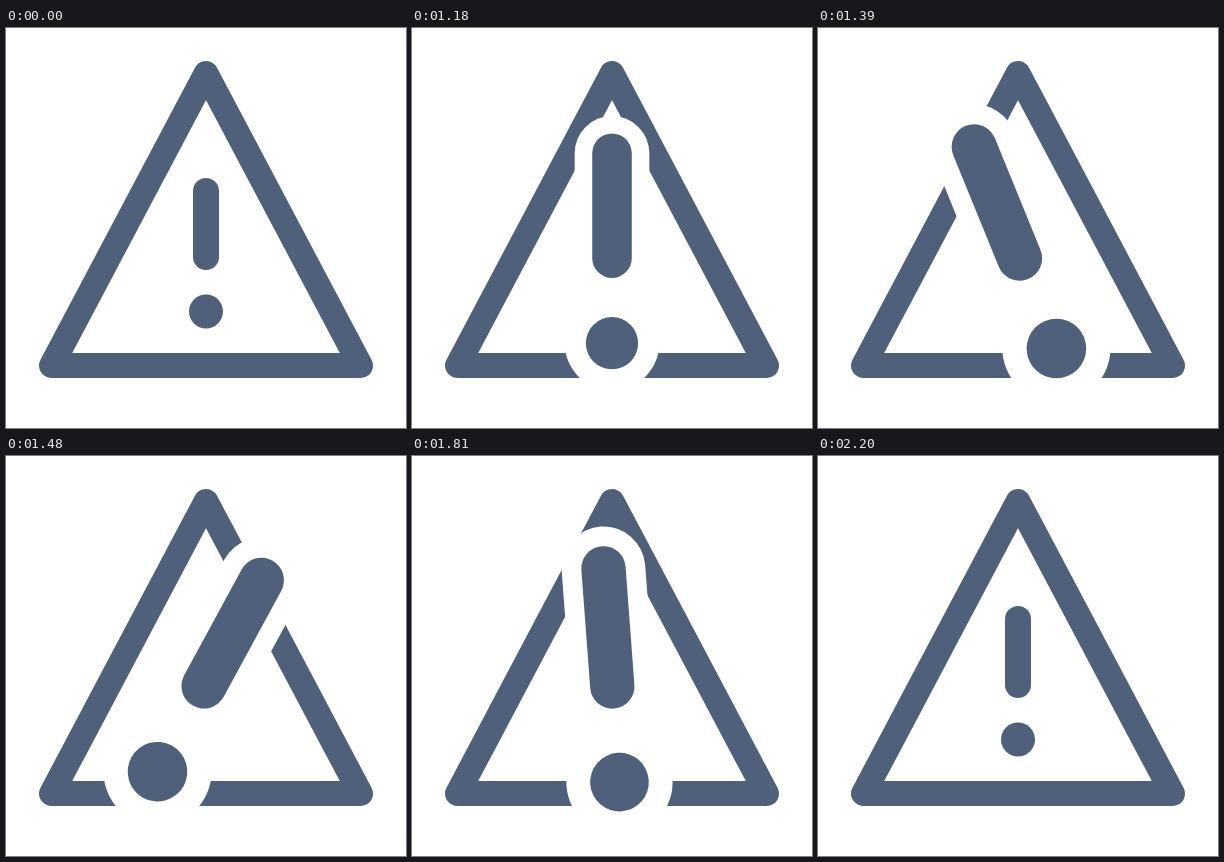
These frames come from a looping animation (400 by 400 pixels, 2260 ms). An HTML page:

```html
<!DOCTYPE html>
<html lang="en">
<head>
<meta charset="utf-8">
<title>Warning sign</title>
<style>
  html, body { margin: 0; width: 100%; height: 100%; overflow: hidden; background: #fff; }
  svg { display: block; width: 100vw; height: 100vh; }
  path, line { stroke-linecap: round; stroke-linejoin: round; }
</style>
</head>
<body>
<svg viewBox="0 0 400 400" fill="#50607a" stroke="none">
  <path d="M200 45.5 354.5 337.5H45.5Z" fill="none" stroke="#50607a" stroke-width="25"/>
  <g id="mark">
    <line stroke="#fff"/>
    <circle fill="#fff"/>
    <line stroke="#50607a"/>
    <circle/>
  </g>
</svg>
<script>
const LOOP = 2260, STEP = 30, PIVOT = 226.3;
const mark = document.getElementById('mark');
const [barHalo, dotHalo, bar, dot] = mark.children;

// [time, value] keys, eased in and out between neighbours
const growth = [[1020, 0], [1270, 1], [1755, 1], [2205, 0]];
const swing = [[1240, 0], [1360, -29.5], [1491, 29.5], [1641, -29.5], [1866, 0]];

function valueAt(keys, t) {
  const next = keys.findIndex(([time]) => time > t);
  if (next === 0) return keys[0][1];
  if (next < 0) return keys[keys.length - 1][1];
  const [t0, a] = keys[next - 1], [t1, b] = keys[next];
  return a + (b - a) * (1 - Math.cos(Math.PI * (t - t0) / (t1 - t0))) / 2;
}

function set(el, attrs) {
  for (const name in attrs) el.setAttribute(name, attrs[name]);
}

function draw(time) {
  const t = Math.floor((time % LOOP - 10) / STEP) * STEP + 10;
  const k = valueAt(growth, t);
  const mix = (small, big) => small + (big - small) * k;

  const ends = { x1: 0, x2: 0, y1: mix(-63.3, -116.2), y2: mix(2.7, 4.3) };
  const cy = mix(57.2, 101.7);
  set(bar, { ...ends, 'stroke-width': mix(26, 45) });
  set(barHalo, { ...ends, 'stroke-width': mix(49, 85) });
  set(dot, { cy, r: mix(17, 29.8) });
  set(dotHalo, { cy, r: mix(30.6, 54) });
  set(mark, { transform: `translate(200 ${PIVOT}) rotate(${valueAt(swing, t)})` });
}

let start;
function tick(now) {
  start ??= now;
  draw(now - start);
  requestAnimationFrame(tick);
}
draw(0);
requestAnimationFrame(tick);
</script>
</body>
</html>
```
